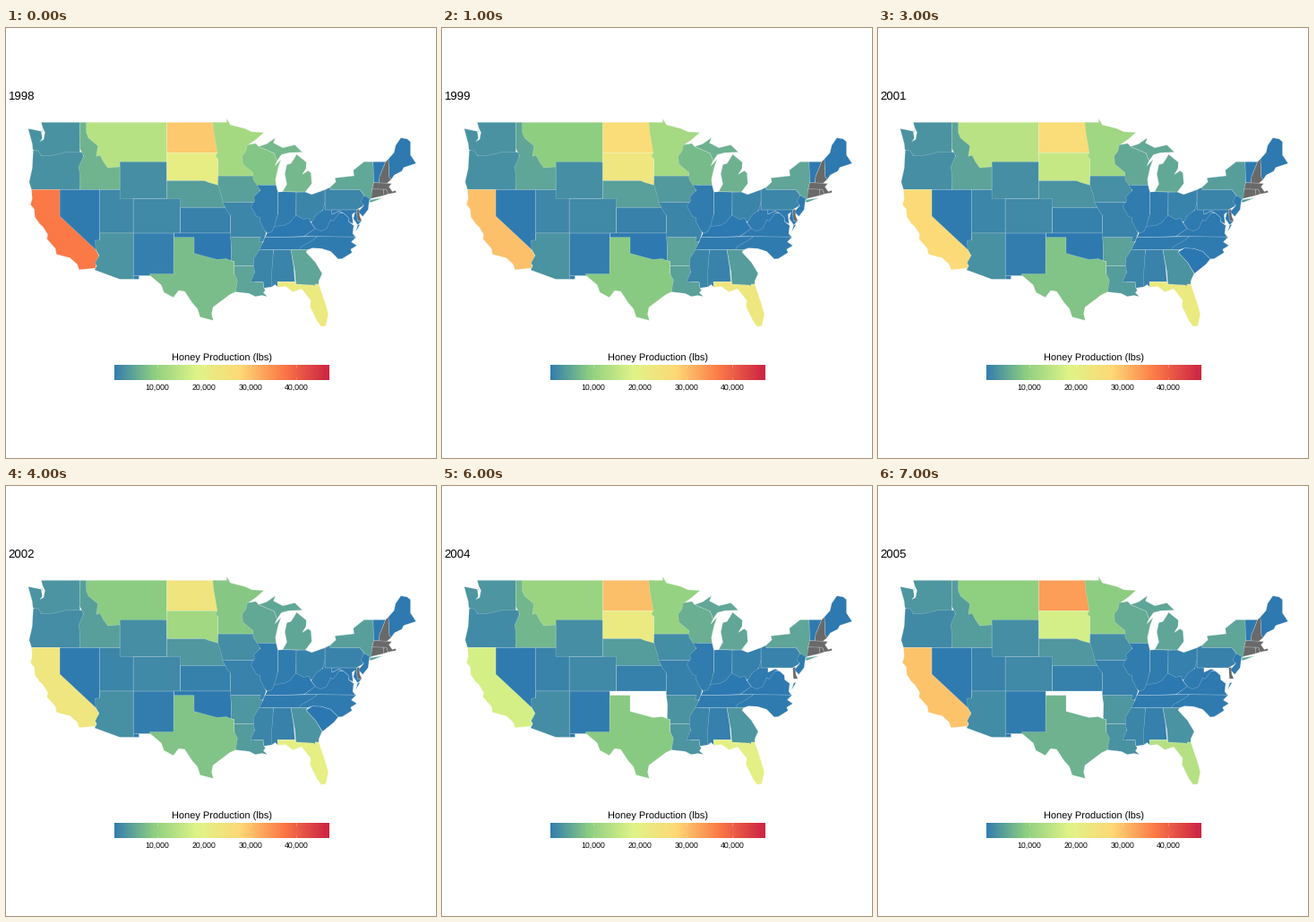
A matplotlib script for the animation above (8 s loop, 480x480 px).

```python
import numpy as np
import matplotlib.pyplot as plt
from matplotlib.animation import FuncAnimation
from matplotlib.colors import LinearSegmentedColormap
from matplotlib.patches import PathPatch
from matplotlib.path import Path

SIZE, DPI = 480, 80
PX = 72 / DPI
START, YEARS = 1998, 8
LOW, HIGH = 84, 46410
NO_DATA = "#696969"
CMAP = LinearSegmentedColormap.from_list(
    "honey", ["#2b77b1", "#8fcf80", "#dff488", "#fdd976", "#fb7a47", "#cf2843"], N=1024)

plt.rcParams["font.family"] = "Liberation Sans"
plt.rcParams["text.hinting"] = "none"
fig = plt.figure(figsize=(SIZE / DPI, SIZE / DPI), dpi=DPI, facecolor="white")
ax = fig.add_axes([0, 0, 1, 1])
ax.axis("off")

states = []


def colour(value):
    return CMAP((value - LOW) / (HIGH - LOW))


def project(ring):
    """Mercator projection of flat (west longitude, latitude) pairs to pixels."""
    west, lat = np.reshape(ring, (-1, 2)).T
    north = np.arcsinh(np.tan(np.radians(lat)))
    return np.column_stack([60 + (120 - west) * 7.5, 105 + (0.9845 - north) * 429.7])


def box(west, east, south, north):
    return [west, north, east, north, east, south, west, south]


def state(keys, *rings, shown=range(YEARS)):
    """Add a state. Key values (thousands) are spread evenly over the years.

    Later states cover the loose inner edges of earlier ones.
    """
    paths = [Path(project(r + r[:2]), closed=True) for r in rings]
    patch = PathPatch(Path.make_compound_path(*paths), facecolor=NO_DATA, snap=False,
                      edgecolor=(1, 1, 1, 0.35), linewidth=0.5 * PX, joinstyle="round")
    ax.add_patch(patch)
    if keys:
        steps = np.linspace(0, len(keys) - 1, YEARS)
        values = 1000 * np.interp(steps, range(len(keys)), keys)
        states.append((patch, values, shown))


# Northwest
state([2.9, 3.3],  # Washington
      [124.7, 48.38, 122.75, 48.12, 122.6, 47.4, 122.95, 47.1, 122.4, 47.3, 122.2, 48,
       122.5, 48.4, 122.76, 49, 117.03, 49, 117, 45.8, 122, 45.3, 124, 46.27, 124.1, 46.9],
      [122.7, 48.35, 122.4, 47.95, 122.6, 48.1])
state([2.8, 2.1],  # Oregon
      [123.95, 46.18, 123.2, 46.15, 122.75, 45.65, 121.2, 45.65, 119, 46, 116.5, 46,
       116.5, 44, 117.03, 42, 124.2, 42, 124.55, 42.84, 124.1, 44.3])
state([6.5, 4.9, 5.2, 4.7, 4.3, 4.7, 6.7, 4],  # Idaho
      [117.03, 49, 117.03, 46.42, 116.47, 45.6, 117.2, 44.4, 117.03, 43.85, 117.03, 42,
       111.05, 42, 111.05, 46, 113.5, 47.2, 116.05, 49])
state([14, 9.3, 10.6, 14.2, 9, 9.8, 10.7, 9.4],  # Montana
      [116.05, 49, 104.05, 49, 104.05, 45, 111.05, 44.47, 112.85, 44.36, 113.45, 44.95,
       114, 45.68, 114.55, 45.56, 114.32, 46.65, 115.72, 47.45, 116.05, 48])
state([1.9, 1.3], box(114.04, 109.05, 37, 42))  # Utah
state([0.9, 0.6], box(109.05, 103.04, 31.78, 37), box(109.05, 108.21, 31.33, 31.8))  # New Mexico
state([4.2, 4.4, 3, 3.6, 4.2, 3.5], box(104.05, 95.3, 40, 43))  # Nebraska
state([2.5], box(111.05, 104.05, 41, 45))  # Wyoming
state([2], box(109.05, 102.05, 37, 41))  # Colorado
state([0.5], box(120, 114.04, 35, 42))  # Nevada
state([37.3, 30.3, 30.8, 27.6, 23.5, 32.2, 17.5, 30],  # California
      [124.2, 42, 120, 42, 120, 39, 114.63, 35, 114.2, 34.3, 114.7, 32.72, 117.13, 32.53,
       117.4, 33.2, 118.5, 34.03, 119.2, 34.15, 120.5, 34.45, 120.65, 35.15, 121.9, 36.3,
       121.8, 36.85, 122.5, 37.75, 123, 38.1, 123.7, 38.9, 123.8, 39.8, 124.35, 40.3,
       124.1, 41])
state([3.2, 2.3],  # Arizona
      [114.04, 37, 109.05, 37, 109.05, 31.33, 111.07, 31.33, 114.82, 32.5, 114.5, 33,
       114.72, 33.4, 114.14, 34.3, 114.63, 35, 114.75, 36.1, 114.04, 36.2])

# Plains and lakes
state([1.2, 1.1], box(102.05, 94.62, 37, 40))  # Kansas
state([0.4], box(103, 94.43, 33.64, 37), shown=range(6))  # Oklahoma
state([29.4, 26.8, 35, 26.9, 24, 30, 30.4, 33.7], box(104.05, 96.5, 45.94, 49))  # North Dakota
state([21.2, 23.5, 28, 15.6, 11.5, 15.7, 22, 17.4],  # South Dakota
      [104.05, 45.94, 96.56, 45.94, 96.45, 45.3, 96.44, 42.49, 97.9, 42.8, 98.5, 43,
       104.05, 43])
state([4.4, 2.7, 2.3, 2.4],  # Iowa
      [96.45, 43.5, 90.2, 43.5, 90.2, 40.6, 95.77, 40.6, 95.9, 41.2, 96.44, 42.49])
state([11.8, 11.9, 13.8, 11.3, 8.5, 10, 10, 9.2],  # Minnesota
      [97.23, 49, 95.15, 49, 95.15, 49.38, 94.6, 48.75, 92.5, 48.4, 91.4, 48.07, 89.6, 48,
       90.8, 47.3, 92.05, 46.7, 92, 45, 91, 43.5, 96.45, 43.5, 96.45, 45.3, 96.85, 45.6,
       96.56, 45.94, 96.8, 46.9, 97.1, 48.1])
state([8.4, 7.2, 7.9, 5.3, 5.3, 5.6, 6, 5.6],  # Wisconsin
      [92.1, 46.75, 92.3, 46.1, 92.85, 45.6, 92.75, 44.75, 91.25, 43.85, 91.2, 43.1,
       90.64, 42.5, 87.8, 42.5, 87.9, 43.1, 87.5, 44.4, 87.05, 45.25, 88, 44.55,
       87.65, 45.1, 88.1, 45.9, 90.4, 46.57, 90.8, 46.9])
state([7, 5.7, 5, 5.2, 4.9],  # Michigan
      [86.82, 41.76, 83.45, 41.73, 82.5, 42.65, 82.6, 43.8, 83, 44.05, 83.9, 43.65,
       83.35, 44.3, 83.3, 44.95, 84.75, 45.78, 85.05, 45.4, 85.6, 44.8, 86.2, 44.7,
       86.5, 43.7, 86.2, 42.6],
      [90.4, 46.57, 88.1, 45.9, 87.65, 45.1, 87, 45.75, 85.9, 45.95, 83.9, 46, 84.6, 46.47,
       85, 46.75, 86.8, 46.45, 88.2, 46.95, 87.9, 47.47, 89.2, 46.85])

# South
state([4, 5, 4.9, 3.1, 3, 3.3],  # Arkansas
      [94.62, 36.5, 89.8, 36.5, 89.8, 35, 90.8, 33, 94.04, 33, 94.04, 33.55, 94.48, 33.64,
       94.43, 35.4])
state([4.8, 4.1, 3.8, 2.9],  # Louisiana
      [94.04, 33, 91, 33, 91, 31, 89.73, 31, 89.6, 30.2, 89.4, 29.9, 89.7, 29.6, 89.1, 29.1,
       89.9, 29.25, 90.9, 29.1, 91.8, 29.5, 93.85, 29.7, 94, 31])
state([1.7, 1],  # Missouri
      [95.77, 40.6, 91, 40.6, 90, 39, 89.3, 37, 89.7, 36, 90.35, 36, 90.1, 36.5, 94.62, 36.5,
       94.62, 39.1, 95.1, 39.6])
state([0.6],  # Illinois
      [90.64, 42.5, 87.8, 42.5, 87.53, 41.7, 87.53, 39.3, 88, 37, 89.15, 37, 89.5, 37.3,
       90.2, 38.4, 90.15, 38.8, 90.7, 38.95, 91.5, 40, 91.42, 40.38, 91, 40.7, 91.1, 41.2,
       90.15, 41.9])
state([0.6],  # Indiana
      [87.53, 41.72, 86.8, 41.76, 84.8, 41.72, 84.82, 39, 86, 37.7, 88.05, 37.6, 88.05, 37.8,
       87.53, 39.3])
state([1.6, 1],  # Ohio
      [84.8, 41.72, 83.45, 41.73, 82.5, 41.45, 80.52, 41.98, 80.52, 40, 82.3, 38.3,
       84.82, 38.8])
state([0.3],  # Virginia
      [83.68, 36.6, 76, 36.55, 76.4, 36.95, 76.25, 37.9, 77, 38.35, 77.05, 38.85,
       77.72, 39.32, 78.4, 39.4, 79.5, 38.8, 80.3, 37.8, 82, 37.6],
      [75.95, 37.15, 75.3, 38.03, 75.65, 37.95])
state([0.45],  # West Virginia
      [80.52, 40.64, 80.52, 39.72, 79.48, 39.72, 79.48, 39.2, 78.4, 39.6, 77.72, 39.32,
       78.35, 39.4, 79.3, 38.42, 79.65, 38.58, 80.3, 37.5, 81.2, 37.25, 81.97, 37.54,
       82.6, 38.2, 81.75, 39.2, 80.85, 39.65])
state([0.2],  # Kentucky
      [89.15, 37, 88.45, 37.15, 88.05, 37.8, 86.6, 37.9, 85.75, 38.27, 84.85, 39.1,
       83.7, 38.63, 82.9, 38.75, 82.6, 38.2, 81.97, 37.54, 83.68, 36.6, 89.45, 36.5])
state([0.15],  # South Carolina
      [83.35, 34.7, 82.4, 35.2, 81.05, 35.15, 79.67, 34.8, 78.55, 33.86, 79.2, 33.2,
       80.9, 32.05, 81.95, 33.45], shown=range(3, 6))
state([0.5],  # North Carolina
      [84.32, 35, 83.1, 35, 82.4, 35.2, 81.05, 35.15, 79.67, 34.8, 78.55, 33.86, 77.95, 33.9,
       76.5, 34.65, 76.7, 35.05, 75.8, 35.5, 76.6, 35.95, 75.87, 36.55, 81.68, 36.59,
       84.2, 35.6])
state([0.5],  # Tennessee
      [90.3, 35, 84.32, 35, 84, 35.4, 82.6, 36.03, 81.68, 36.59, 89.5, 36.5, 89.7, 36])
state([4.9, 3.4, 3, 3.5, 3],  # Georgia
      [85.6, 35, 83.1, 35, 83.35, 34.7, 81.95, 33.45, 80.95, 32.05, 81.45, 31.1, 81.45, 30.7,
       82.05, 30.36, 84.86, 30.7, 85, 32.3])
state([1.6],  # Mississippi
      [90.3, 35, 88.2, 35, 88.4, 30.35, 89.6, 30.2, 89.73, 31, 91.6, 31, 91, 32.2,
       91.17, 33, 91.1, 33.95])
state([1.5, 1],  # Alabama
      [88.2, 35, 85.6, 35, 85.18, 32.86, 85, 31, 87.6, 31, 87.5, 30.3, 87.95, 30.65,
       88.4, 30.35, 88.47, 31.9])
state([22.5, 23.2, 24.4, 22, 20.4, 15.3, 20.1, 13.8],  # Florida
      [87.6, 31, 85, 31, 84.86, 30.7, 82.2, 30.57, 82.05, 30.36, 82, 30.7, 81.45, 30.7,
       80.55, 28.4, 80.03, 26.8, 80.4, 25.2, 81.1, 25.13, 81.75, 25.95, 82.75, 27.8,
       82.65, 28.6, 84, 30.1, 85.3, 29.7, 86.4, 30.4, 87.5, 30.3])
state([7.5, 8.8, 8.9, 8.1, 8.1, 9.6, 8.8, 6.3],  # Texas
      [103.04, 36.5, 100, 36.5, 100, 34.56, 98.1, 34.13, 96.6, 33.8, 95.2, 33.9,
       94.48, 33.64, 94.04, 33.55, 94.04, 32, 93.55, 31.2, 93.85, 29.7, 94.7, 29.35,
       97.2, 27.7, 97.4, 26.8, 97.15, 25.95, 99.1, 26.4, 99.5, 27.5, 100.3, 28.3,
       101.4, 29.77, 102.3, 29.88, 103.1, 28.98, 104.5, 29.65, 104.9, 30.6, 106.53, 31.78,
       106.62, 32, 103.06, 32])

# Northeast
state([5.2, 4.8, 4, 4.9, 4.9],  # New York
      [79.76, 42.25, 78.9, 42.85, 79.05, 43.27, 76.2, 43.5, 76.3, 44.1, 74.7, 45, 73.35, 45,
       73.27, 42.75, 73.5, 42.05, 73.5, 41.1, 74, 40.7, 74.7, 41.36, 75.35, 42, 79.76, 42],
      [74, 40.6, 73.7, 40.87, 71.9, 41.07, 73.6, 40.58])
state([0.4], [73.35, 45, 71.5, 45, 72.4, 43.4, 72.46, 42.73, 73.27, 42.75])  # Vermont
state([0.3],  # Maine
      [71.08, 45.3, 70.25, 45.95, 70, 46.7, 69.23, 47.46, 68.3, 47.35, 67.8, 47.07,
       67.8, 45.7, 66.97, 44.83, 68.8, 44.4, 69.1, 44, 70.2, 43.6, 70.7, 43.07, 70.97, 43.4])
state(None,  # New Hampshire
      [71.5, 45, 71.08, 45.3, 70.97, 43.4, 70.7, 43.07, 71.3, 42.7, 72.46, 42.73, 72.4, 43.4])
state(None,  # Massachusetts
      [73.27, 42.75, 71.3, 42.7, 70.6, 42.65, 71, 42.3, 70.5, 41.78, 70, 41.9, 69.95, 41.67,
       71.13, 41.5, 71.38, 42.02, 73.5, 42.05])
state(None, [73.5, 42.05, 71.8, 42.02, 71.85, 41.32, 73.65, 41])  # Connecticut
state(None, [71.8, 42.02, 71.38, 42.02, 71.13, 41.5, 71.85, 41.32])  # Rhode Island
state([0.3],  # Maryland
      [79.48, 39.72, 75.79, 39.72, 75.7, 38.46, 75.05, 38.45, 75.65, 37.95, 76.3, 38.7,
       76.05, 39.45, 76.5, 39.2, 76.35, 38.1, 77, 38.35, 77.05, 38.85, 77.72, 39.32,
       78.4, 39.6, 79.48, 39.2], shown=range(6))
state([1.7, 1.2],  # Pennsylvania
      [80.52, 41.98, 79.76, 42.25, 79.76, 42, 75.35, 42, 74.7, 41.36, 74.85, 40.15,
       75.6, 39.83, 75.79, 39.72, 80.52, 39.72])
state(None, [75.79, 39.72, 75.4, 39.8, 75.35, 39, 75.05, 38.45, 75.7, 38.46])  # Delaware
state([0.4],  # New Jersey
      [74.7, 41.36, 73.9, 41, 74, 40.4, 74.1, 39.75, 74.9, 38.95, 75.55, 39.5, 74.75, 40.2,
       75.2, 40.65])

# Legend
LEFT, RIGHT, TOP, BOTTOM = 121, 361, 376, 393
PER_PX = 10000 / 51.8
first = 10000 - (169 - LEFT) * PER_PX
ramp = first + np.linspace(0, RIGHT - LEFT, 480) * PER_PX
ax.imshow(colour(ramp)[None], extent=(LEFT, RIGHT, BOTTOM, TOP), aspect="auto",
          interpolation="nearest")
ax.text(241, 372, "Honey Production (lbs)", size=11 * PX, ha="center", va="baseline")
for amount in range(10000, 50000, 10000):
    x = LEFT + (amount - first) / PER_PX
    for y0, y1 in ((TOP, TOP + 3.4), (BOTTOM - 3.4, BOTTOM)):
        ax.plot([x, x], [y0, y1], color="white", alpha=0.5, lw=0.5 * PX)
    ax.text(x, 404, f"{amount:,}", size=8.8 * PX, ha="center", va="baseline")

year = ax.text(2.5, 80, "", size=13.2 * PX, va="baseline")
ax.set_xlim(0, SIZE)
ax.set_ylim(SIZE, 0)


def draw(i):
    year.set_text(str(START + i))
    for patch, values, shown in states:
        patch.set_visible(i in shown)
        patch.set_facecolor(colour(values[i]))
    return [year] + [patch for patch, *_ in states]


anim = FuncAnimation(fig, draw, frames=YEARS, interval=1000, repeat=True, repeat_delay=0)
plt.show()
```
